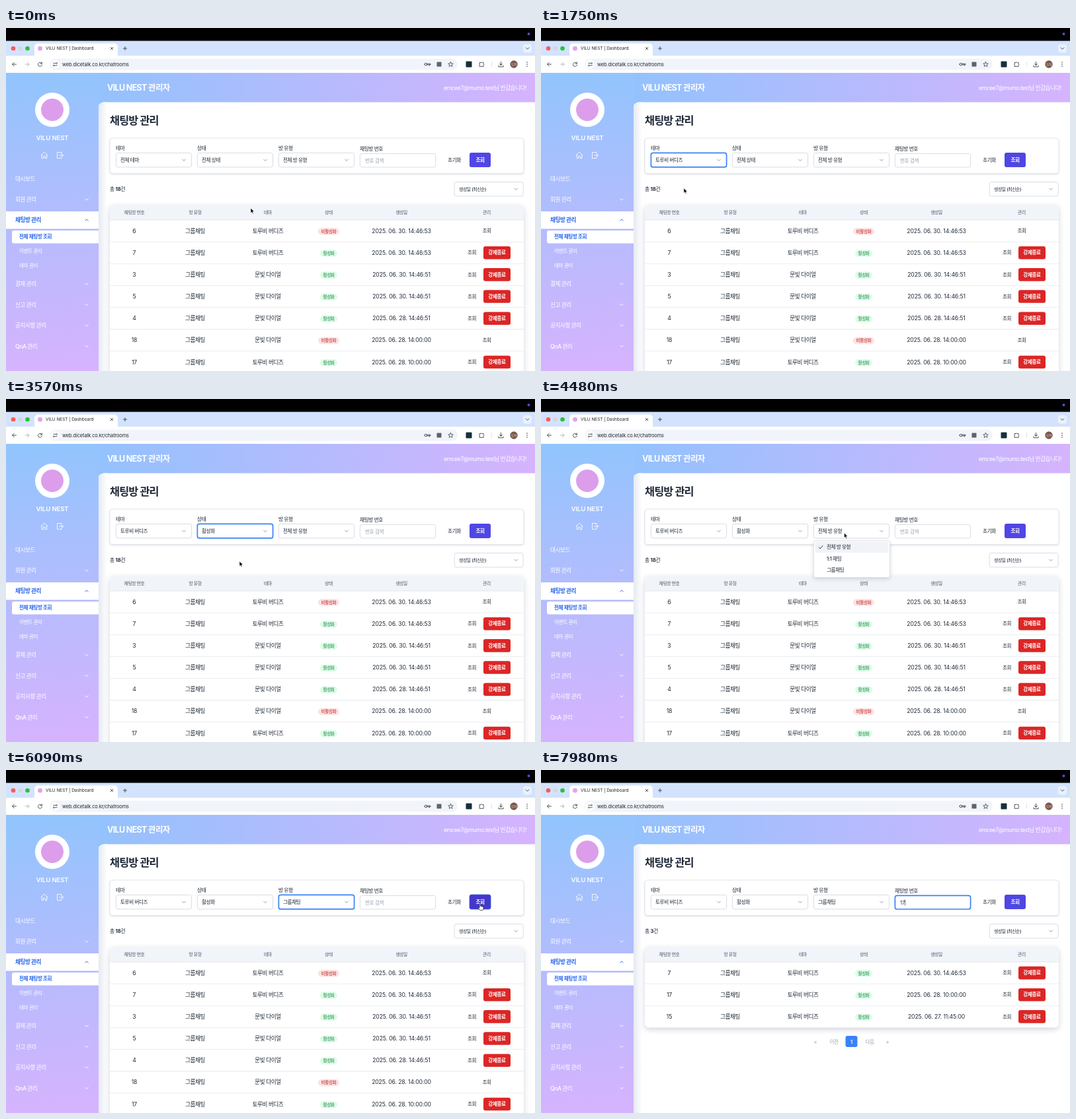
An HTML page with a canvas for the animation above (8000 ms loop, 800 by 520 pixels).

```html
<!DOCTYPE html>
<html lang="ko">
<head>
<meta charset="utf-8">
<style>
html, body { margin: 0; width: 100%; height: 100%; overflow: hidden; background: #fff; }
canvas { display: block; width: 800px; height: 520px; }
</style>
</head>
<body>
<canvas id="stage"></canvas>
<script>
const LOOP = 8000;
const FONT = "Inter, 'Noto Sans CJK KR', 'Noto Sans CJK', sans-serif";
const BRAND = 'VILU NEST';
const INK = '#1f2937', GRAY = '#9ca3af', LINE = '#d5d9e0', BLUE = '#3b82f6';
const THEMES = ['토루비 버디즈', '문빛 다이얼'];

const canvas = document.getElementById('stage');
const ctx = canvas.getContext('2d');
const dpr = window.devicePixelRatio || 1;
canvas.width = 800 * dpr;
canvas.height = 520 * dpr;

const clamp = v => Math.max(0, Math.min(1, v));
const smooth = v => v * v * (3 - 2 * v);
const inside = (p, x, y, w, h) => p.x >= x && p.x <= x + w && p.y >= y && p.y <= y + h;

function text(str, x, y, size, { color = INK, weight = 400, align = 'left' } = {}) {
  ctx.font = `${weight} ${size}px ${FONT}`;
  ctx.letterSpacing = (/[가-힣]/.test(str) ? -0.052 : -0.012) * size + 'px';
  ctx.textAlign = align;
  ctx.fillStyle = color;
  ctx.fillText(str, x, y + size * 0.36);
  return ctx.measureText(str).width;
}

function box(x, y, w, h, r, fill, stroke, lw = 0.8, blur = 0, drop = 1) {
  ctx.save();
  ctx.beginPath();
  ctx.roundRect(x, y, w, h, r);
  if (blur) {
    ctx.shadowColor = 'rgba(30,41,80,.2)';
    ctx.shadowBlur = blur * dpr;
    ctx.shadowOffsetY = drop * dpr;
  }
  if (fill) { ctx.fillStyle = fill; ctx.fill(); }
  ctx.shadowColor = 'transparent';
  if (stroke) { ctx.strokeStyle = stroke; ctx.lineWidth = lw; ctx.stroke(); }
  ctx.restore();
}

function disc(x, y, r, fill) {
  ctx.beginPath();
  ctx.arc(x, y, r, 0, Math.PI * 2);
  ctx.fillStyle = fill;
  ctx.fill();
}

// Icon paths are drawn relative to their centre.
function icon(d, x, y, color, lw = 0.9, fill) {
  ctx.save();
  ctx.translate(x, y);
  ctx.lineCap = ctx.lineJoin = 'round';
  const path = new Path2D(d);
  if (fill) { ctx.fillStyle = fill; ctx.fill(path); }
  ctx.strokeStyle = color;
  ctx.lineWidth = lw;
  ctx.stroke(path);
  ctx.restore();
}

const chevron = (x, y, color, up) =>
  icon(up ? 'M-2.3 1.2L0 -1.2L2.3 1.2' : 'M-2.3 -1.2L0 1.2L2.3 -1.2', x, y, color);

function gradient(x0, y0, x1, y1, from, to) {
  const g = ctx.createLinearGradient(x0, y0, x1, y1);
  g.addColorStop(0, from);
  g.addColorStop(1, to);
  return g;
}

function browser() {
  const dark = '#3c4043';
  box(0, 0, 800, 20, 0, '#000');
  disc(790.5, 9, 2, '#5a48e0');
  box(0, 19.5, 800, 23, 0, '#d3e3fd');
  disc(11, 31, 3.3, '#fb5b54');
  disc(21.8, 31, 3.3, '#d3d7de');
  disc(32.5, 31, 3.3, '#2bc03e');
  box(43, 23.5, 126, 20, [5, 5, 0, 0], '#fff');
  disc(51.5, 31, 3.5, '#dfa5e9');
  text(BRAND + ' | Dashboard', 60, 31, 6.6, { color: '#24272b' });
  icon('M-1.8 -1.8L1.8 1.8M1.8 -1.8L-1.8 1.8', 160, 31, dark);
  icon('M-2.6 0H2.6M0 -2.6V2.6', 180, 31, dark);
  box(782, 24.5, 13, 13, 4, '#e9f1fe');
  chevron(788.5, 31, dark);

  box(0, 42, 800, 26, 0, '#fff');
  icon('M3 0H-3M-.2 -2.8L-3 0L-.2 2.8', 12.5, 55, dark);
  icon('M-3 0H3M.2 -2.8L3 0L.2 2.8', 32, 55, '#aeb1b5');
  icon('M2.6 -1.2A3 3 0 1 0 2.9 1M2.8 -3.2V-1H.6', 51.5, 55, dark);
  box(66, 46.5, 617, 17, 8.5, '#f1f4fa');
  disc(74.5, 55, 6.5, '#fff');
  icon('M-3 -1.6H.2M-.2 1.8H3M1 -1.6a1 1 0 1 0 2 0a1 1 0 1 0 -2 0M-3 1.8a1 1 0 1 0 2 0a1 1 0 1 0 -2 0', 74.5, 55, dark, 0.8);
  text('web.dicetalk.co.kr/chatrooms', 85, 55, 7.4, { color: '#24272b' });
  icon('M-4.5 0a1.8 1.8 0 1 0 3.6 0a1.8 1.8 0 1 0 -3.6 0M-.9 -.8H4.4V.8H-.9M2.8 .8V2', 637.5, 55, dark);
  box(651.5, 51.5, 7, 7, 0.5, '#5f6368');
  icon('M0 -3.7L1.1 -1.2L3.8 -1L1.7 .8L2.4 3.4L0 2L-2.4 3.4L-1.7 .8L-3.8 -1L-1.1 -1.2Z', 672.5, 55, dark, 0.8);
  box(695.5, 50.5, 9, 9, 1, '#16303c');
  icon('M-3 -2H-1A1.1 1.1 0 0 1 1 -2H2.6V0A1.1 1.1 0 0 1 2.6 2V3.8H-3Z', 719.5, 54.5, dark);
  box(734, 51, 0.8, 8, 0, '#cfdcf3');
  icon('M0 -3.8V1.4M-2.2 -.7L0 1.5L2.2 -.7M-3.6 2V3.8H3.6V2', 748.5, 55, dark);
  disc(768, 55, 5.7, '#795548');
  text('도아', 768, 55, 4.6, { color: '#eee', align: 'center' });
  [-3, 0, 3].forEach(d => disc(788, 55 + d, 0.8, dark));
}

function sidebar() {
  box(0, 68, 140, 452, 0, gradient(0, 68, 40, 520, '#91c5fd', '#d6b3fe'));
  disc(70, 124, 26, '#fff');
  disc(70, 124, 17, '#dc9eea');
  text(BRAND, 70, 167, 9.6, { color: '#fff', weight: 600, align: 'center' });
  icon('M-5 0L0 -5L5 0M-3.8 -1V4.7H-1.3V1.2H1.3V4.7H3.8V-1', 58, 193, '#fff', 0.85);
  icon('M2 -2V-4.5H-4.5V4.5H2V2M-1.5 0H4.7M2.8 -1.9L4.7 0L2.8 1.9', 82, 193, '#fff', 0.85);

  box(0, 278, 140, 26.5, 0, '#fff');
  box(9, 307, 131, 19.5, [3, 0, 0, 3], '#fff');
  const items = [['대시보드', 228.5], ['회원 관리', 260], ['채팅방 관리', 291], ['결제 관리', 388],
    ['신고 관리', 419.5], ['공지사항 관리', 451], ['QnA 관리', 482.5]];
  items.forEach(([label, y], i) => {
    const active = i === 2, color = active ? '#2563eb' : '#fff';
    text(label, 14, y, 8.6, { color, weight: active ? 600 : 500 });
    if (i) chevron(122, y, color, active);
  });
  text('전체 채팅방 조회', 20, 316.5, 7.6, { color: '#2563eb', weight: 600 });
  text('이벤트 관리', 20, 338.5, 7.6, { color: '#fff' });
  text('테마 관리', 20, 360, 7.6, { color: '#fff' });
}

function pageBase() {
  box(140, 68, 660, 80, 0, gradient(140, 68, 800, 110, '#93c2fd', '#d6b3fe'));
  box(139, 112.5, 670, 420, [9, 0, 0, 0], '#fff');
  box(139, 112.5, 14, 420, [9, 0, 0, 0], gradient(139, 0, 153, 0, '#e3e8f1', '#ffffff'));
  sidebar();
  text(BRAND + ' 관리자', 153, 90.5, 12.5, { color: '#fff', weight: 700 });
  text('emcee7@mumo.test님 반갑습니다!', 787, 90.5, 8.6, { color: '#fff', align: 'right' });
  text('채팅방 관리', 157, 140, 16.3, { weight: 700 });
}

const selects = [
  { x: 166, label: '테마', open: 900, pick: 1600, choice: 1, options: ['전체 테마', THEMES[0], '문빛다이얼'] },
  { x: 289, label: '상태', open: 2600, pick: 3400, choice: 1, options: ['전체 상태', '활성화', '비활성화'] },
  { x: 412, label: '방 유형', open: 4330, pick: 5020, choice: 2, options: ['전체 방 유형', '1:1 채팅', '그룹채팅'] }
];
const isOpen = (s, t) => t >= s.open && t < s.pick;
const SEARCH = 6250, INPUT_FOCUS = 6900, TYPE = [7450, 7650];

function filters(t, p) {
  box(157, 167, 626, 53.5, 4, '#fff', '#dfe3ea', 0.8, 3);
  const anyOpen = selects.some(s => isOpen(s, t));
  selects.forEach((s, i) => {
    const blurAt = i < 2 ? selects[i + 1].open : 6150;
    const focus = t >= s.pick && t < blurAt;
    const hover = !anyOpen && inside(p, s.x, 189, 115, 22);
    text(s.label, s.x, 182, 7.7, { weight: 500 });
    box(s.x + 0.4, 189.4, 114.2, 21.5, 3, '#fff', focus ? BLUE : hover ? '#7c83ee' : LINE, focus ? 1.7 : 0.9);
    text(s.options[t >= s.pick ? s.choice : 0], s.x + 7, 200.3, 7.6, { weight: 500 });
    chevron(s.x + 103, 200.3, '#8b93a1');
  });

  const focus = t >= INPUT_FOCUS;
  text('채팅방 번호', 535, 183, 7.7, { weight: 500 });
  box(535.4, 190.4, 114.2, 20.6, 3, '#fff', focus ? BLUE : LINE, focus ? 1.7 : 0.9);
  const typed = '17'.slice(0, TYPE.filter(at => t >= at).length);
  const width = typed ? text(typed, 543, 201, 7.6) : 0;
  if (!typed) text('번호 검색', 543, 201, 7.6, { color: GRAY });
  const sinceKey = t - (typed ? TYPE[typed.length - 1] : INPUT_FOCUS);
  if (focus && sinceKey % 1000 < 500) box(543 + width, 196.5, 0.7, 9, 0, INK);

  const fade = (on, off) => clamp((t - on) / 120) * clamp(1 - (t - off) / 250);
  ctx.globalAlpha = Math.max(fade(5740, 5800), fade(6500, 6620));
  box(659, 189.4, 38, 21.5, 3, '#fff', LINE);
  ctx.globalAlpha = 1;
  text('초기화', 678, 200.3, 7.6, { weight: 500, align: 'center' });
  box(701, 189, 32, 22, 3, '#4f46e5');
  ctx.globalAlpha = fade(5850, 6670);
  box(701, 189, 32, 22, 3, '#4338ca', '#2f5be0');
  ctx.globalAlpha = 1;
  text('조회', 717, 200.3, 7.6, { color: '#fff', weight: 600, align: 'center' });
}

// number, theme index, active, date
const rows = [
  [6, 0, 0, '06. 30. 14:46:53'], [7, 0, 1, '06. 30. 14:46:53'], [3, 1, 1, '06. 30. 14:46:51'],
  [5, 1, 1, '06. 30. 14:46:51'], [4, 1, 1, '06. 28. 14:46:51'], [18, 1, 0, '06. 28. 14:00:00'],
  [17, 0, 1, '06. 28. 10:00:00']
];
const found = [rows[1], rows[6], [15, 0, 1, '06. 27. 11:45:00']];
const COLS = [194, 286, 396, 488, 598];
const ROW = 33.15;

function table(t) {
  const done = t >= SEARCH, list = done ? found : rows;
  const center = { align: 'center' };
  let x = 157 + text('총 ', 157, 244.3, 7.7);
  x += text(done ? '3' : '18', x, 244.3, 7.7, { weight: 700 });
  text('건', x, 244.3, 7.7);
  box(678.2, 233.5, 104, 21.5, 3, '#fff', LINE, 0.9);
  text('생성일 (최신순)', 685, 244.3, 6.8, { weight: 500 });
  chevron(771, 244.3, '#8b93a1');

  const height = done ? 23 + 3 * ROW : 270;
  box(157, 268, 626, height, 6, '#fff', null, 0, 9, 3);
  box(157, 268, 626, 23, [6, 6, 0, 0], '#f1f5f9');
  ['채팅방 번호', '방 유형', '테마', '상태', '생성일', '관리'].forEach((h, i) =>
    text(h, [...COLS, 727][i], 279.8, 6.8, { ...center, weight: 500, color: '#4b5563' }));

  list.forEach(([id, theme, active, date], i) => {
    const top = 291 + i * ROW, y = top + 16.6;
    box(157, top - 0.4, 626, 0.8, 0, '#e5e8ed');
    text(String(id), COLS[0], y, 8.7, center);
    text('그룹채팅', COLS[1], y, 8.6, center);
    text(THEMES[theme], COLS[2], y, 8.6, center);
    const w = active ? 26 : 32;
    box(COLS[3] - w / 2, y - 4.6, w, 10.6, 5.3, active ? '#dcfce7' : '#fee2e2');
    text(active ? '활성화' : '비활성화', COLS[3], y + 0.7, 6.6,
      { ...center, weight: 500, color: active ? '#15803d' : '#b91c1c' });
    text('2025. ' + date, COLS[4], y, 8.6, center);
    text('조회', active ? 704.5 : 727, y, 7.6, { ...center, weight: 500 });
    if (active) {
      box(722, y - 9.8, 41, 19.6, 3, '#dc2626');
      text('강제종료', 742.5, y, 7.6, { ...center, weight: 600, color: '#fff' });
    }
  });

  if (!done) return;
  box(460.5, 403, 18, 17, 3, BLUE);
  [['«', 415], ['이전', 443], ['1', 469.5], ['다음', 497], ['»', 524]].forEach(([s, px], i) =>
    text(s, px, 411.8, 7.6, { ...center, weight: i === 2 ? 600 : 400, color: i === 2 ? '#fff' : GRAY }));
}

function popup(t, p) {
  const s = selects.find(item => isOpen(item, t));
  if (!s) return;
  const x = s.x + 0.5;
  box(x, 215, 115, 55.5, 3, '#fff', '#dcdfe6', 0.8, 6, 2);
  const over = Math.max(0, Math.min(2, Math.floor((p.y - 216) / 17.4)));
  box(x + 2, 216.5 + over * 17.4, 111, 16.5, 2, '#f1f3f8');
  s.options.forEach((o, i) => text(o, s.x + 20, 224.7 + i * 17.4, 7.6, { weight: 500 }));
  icon('M-2.8 .2L-.8 2.2L3 -2.2', s.x + 11, 224.7, INK);
}

// time, x, y
const path = [
  [0, 370, 273], [210, 370, 273], [800, 233, 196], [1180, 233, 196], [1500, 215, 243], [1720, 215, 243],
  [2380, 360, 204], [2750, 360, 204], [3150, 353, 246], [3640, 353, 246], [4200, 460, 203], [4600, 458, 203],
  [4850, 445, 260], [5040, 445, 260], [5460, 570, 210], [5950, 717, 203], [6450, 717, 203],
  [6650, 643, 207], [6850, 600, 201], [LOOP, 600, 201]
];

function pointer(t) {
  const i = path.findIndex(k => k[0] > t);
  const [a, b] = [path[i - 1], path[i]];
  const f = smooth((t - a[0]) / (b[0] - a[0]));
  return { x: a[1] + (b[1] - a[1]) * f, y: a[2] + (b[2] - a[2]) * f };
}

function cursor(t, p) {
  if (t >= TYPE[0]) return;
  const overSelect = selects.some(s => inside(p, s.x, 189, 115, 22)) && !selects.some(s => isOpen(s, t));
  const overButton = inside(p, 659, 189, 38, 22) || inside(p, 701, 189, 32, 22);
  if (overSelect || overButton) {
    icon('M-1 5V.8Q-1 0 -.2 0Q.7 0 .7 .8V3.6Q1.4 3.1 2.2 3.8Q3 3.4 3.6 4.2Q5 4 5 5.2V7Q5 9.5 3.3 9.7H.3Q-1 9 -3 5.8Q-3 4.6 -1.8 5.3L-1 6Z',
      p.x, p.y, '#222', 0.8, '#fff');
  } else if (t >= 6750) {
    icon('M-1.6 -4Q0 -4 0 -3V3Q0 4 -1.6 4M1.6 -4Q0 -4 0 -3M0 3Q0 4 1.6 4', p.x, p.y, '#222', 0.8);
  } else {
    icon('M0 0V7.6L1.7 6.1L2.9 8.8L4.2 8.2L3 5.6H5.3Z', p.x, p.y, '#fff', 0.7, '#000');
  }
}

function draw(now) {
  const t = now % LOOP, p = pointer(t);
  ctx.setTransform(dpr, 0, 0, dpr, 0, 0);
  ctx.clearRect(0, 0, 800, 520);
  pageBase();
  browser();
  filters(t, p);
  table(t);
  popup(t, p);
  cursor(t, p);
}

const start = performance.now();
function tick() {
  draw(performance.now() - start);
  requestAnimationFrame(tick);
}
tick();
</script>
</body>
</html>
```
